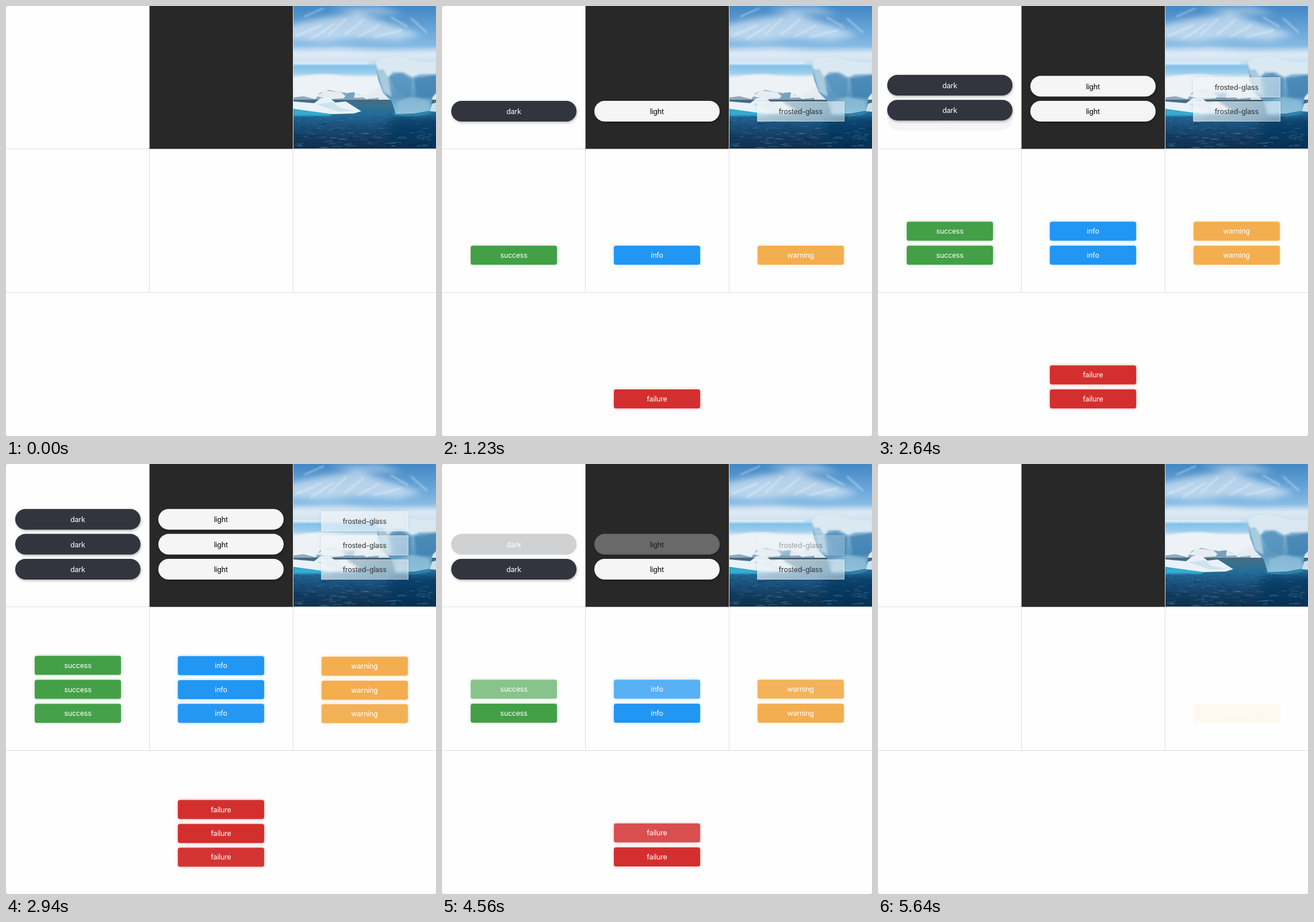
Write an HTML page that moves like this. It is 748 px wide and 748 px high and loops after 6060 ms.

```html
<!DOCTYPE html>
<html lang="en">
<head>
<meta charset="utf-8">
<title>Toast themes</title>
<style>
  html, body { margin: 0; width: 100%; height: 100%; overflow: hidden; background: #777; }
  #stage { position: relative; width: 748px; height: 748px; overflow: hidden; background: #fefefe; border-radius: 2px; }
  .line { position: absolute; background: #ddd; }
  .night {
    position: absolute; left: 249px; top: 0; width: 249px; height: 248px; background: #282828;
    border-left: 1px solid #aaa; border-bottom: 1px solid #808080;
  }
  #photo { position: absolute; left: 500px; top: 0; width: 248px; height: 248px; }
  .toast {
    position: absolute; box-sizing: border-box; display: flex; align-items: center; justify-content: center;
    font: 400 12.5px Inter, sans-serif; letter-spacing: -.2px; color: #fff; opacity: 0;
  }
  .pill { height: 36px; border-radius: 18px; }
  .dark { background: #32353d; box-shadow: 1px 2px 4px rgba(0, 0, 0, .28); }
  .light { background: #f5f5f5; color: #000; box-shadow: 1px 2px 4px rgba(0, 0, 0, .28); }
  .frosted-glass {
    height: 35px; color: #333; border: 1px solid rgba(255, 255, 255, .35);
    background: linear-gradient(120deg, rgba(240, 245, 248, .7), rgba(232, 240, 244, .52));
    backdrop-filter: blur(2px); box-shadow: 0 0 5px rgba(0, 0, 0, .12);
  }
  .flat { height: 33.5px; border-radius: 3.5px; }
  .success { background: #43a047; box-shadow: 0 0 5px rgba(67, 160, 71, .45); }
  .info { background: #2196f3; box-shadow: 0 0 5px rgba(33, 150, 243, .45); }
  .warning { background: #f3ae50; box-shadow: 0 0 5px rgba(243, 174, 80, .45); }
  .failure { background: #d32f2f; box-shadow: 0 0 5px rgba(211, 47, 47, .45); }
</style>
</head>
<body>
<div id="stage">
  <svg id="photo" viewBox="0 0 248 248">
    <defs>
      <linearGradient id="sky" x2="0" y2="1">
        <stop offset="0" stop-color="#4387c4"/>
        <stop offset=".3" stop-color="#6fabdc"/>
        <stop offset=".42" stop-color="#86bbe4"/>
        <stop offset=".5" stop-color="#cfe2f0"/>
        <stop offset=".6" stop-color="#c4dff0"/>
        <stop offset=".63" stop-color="#83c1e9"/>
        <stop offset=".7" stop-color="#9ccdeb"/>
        <stop offset=".76" stop-color="#e8f0f5"/>
        <stop offset="1" stop-color="#dce8f0"/>
      </linearGradient>
      <linearGradient id="sea" x2="0" y2="1">
        <stop offset="0" stop-color="#48697f"/>
        <stop offset=".12" stop-color="#37718f"/>
        <stop offset=".3" stop-color="#246c99"/>
        <stop offset=".5" stop-color="#1b5480"/>
        <stop offset=".75" stop-color="#143f63"/>
        <stop offset="1" stop-color="#112f4c"/>
      </linearGradient>
      <linearGradient id="ice" x2="0" y2="1">
        <stop offset="0" stop-color="#cfe2ee"/>
        <stop offset=".35" stop-color="#7eafd0"/>
        <stop offset=".7" stop-color="#5a97c0"/>
        <stop offset="1" stop-color="#93c3dc"/>
      </linearGradient>
      <filter id="soft" x="-30%" y="-80%" width="160%" height="260%"><feGaussianBlur stdDeviation="6"/></filter>
      <filter id="haze" x="-20%" y="-20%" width="140%" height="140%"><feGaussianBlur stdDeviation="1.5"/></filter>
    </defs>
    <rect width="248" height="166" fill="url(#sky)"/>
    <g fill="#e9f1f8" filter="url(#soft)">
      <path d="M-10 34L45 22L110 12L165 30L225 50L180 60L110 56L50 62L-10 58Z" opacity=".62"/>
      <path d="M60 2L150 0L190 14L120 16Z" opacity=".45"/>
      <path d="M-10 76L80 72L150 82L258 78V92L-10 92Z" opacity=".6"/>
    </g>
    <g fill="none" stroke="#f3f8fb" stroke-linecap="round" filter="url(#haze)">
      <path d="M5 52L48 34M30 58L70 32M62 50L92 22M90 50L122 24M112 54L150 34M140 54L188 42M20 18L52 4M170 20L198 36M205 22L232 46" stroke-width="3" opacity=".4"/>
      <path d="M0 99H130" stroke-width="2.5" opacity=".8"/>
    </g>
    <path d="M0 125Q45 116 75 120T150 122V164H0Z" fill="#ecf2f6" filter="url(#haze)"/>
    <path d="M0 159L18 157L38 162L46 151L62 146L76 149L92 151L101 156L112 153L127 162L148 157V168H0Z" fill="#8fa9bc"/>
    <path d="M40 157L55 147L83 150L94 160L65 162ZM96 160L106 151L123 159ZM121 157L148 141L160 158L135 161Z" fill="#e5edf3"/>
    <path d="M87 161L95 151L107 150L105 162Z" fill="#74a2c0"/>
    <rect y="163" width="248" height="85" fill="url(#sea)"/>
    <path d="M0 179L70 184L63 191L0 191Z" fill="#35acd2" filter="url(#haze)"/>
    <path d="M0 166L36 169L48 160L62 159L73 168L91 166L118 183L105 187L67 188L0 179Z" fill="#e9f2f8"/>
    <path d="M40 171L68 167L80 177L106 182L78 184Z" fill="#bed9e9" opacity=".6"/>
    <path d="M168 194H260V260H160Z" fill="#06355c" opacity=".6" filter="url(#soft)"/>
    <path d="M174 187Q205 195 239 184" stroke="#2d8bb4" stroke-width="4" fill="none" filter="url(#haze)"/>
    <path d="M237 183L241 170L248 168V184Z" fill="#c9dfeb"/>
    <path d="M141 96L150 88L184 85L217 95L249 97V150L242 158L238 182L211 187L178 188L171 166L156 151L147 128Z" fill="url(#ice)"/>
    <g filter="url(#haze)">
      <path d="M146 112L163 114L171 158L156 150Z" fill="#a9cbde"/>
      <path d="M166 122L186 116L206 128L203 160L180 150Z" fill="#4f8fbc" opacity=".7"/>
      <path d="M210 126L249 120V150L240 160L214 158Z" fill="#3f80b1" opacity=".75"/>
      <path d="M180 166L205 158L236 165L236 181L209 185L182 186Z" fill="#8fc0da" opacity=".7"/>
      <path d="M142 96L151 88L184 86L216 95L249 97V118L219 119L207 124L191 115L173 115L165 124L157 111L147 111Z" fill="#d9e8f1"/>
    </g>
    <g id="waves" fill="none"></g>
  </svg>
  <div class="line" style="left:0;top:248px;width:748px;height:1px"></div>
  <div class="line" style="left:0;top:498px;width:748px;height:1px"></div>
  <div class="line" style="left:249px;top:0;width:1px;height:498px"></div>
  <div class="line" style="left:499px;top:0;width:1px;height:498px"></div>
  <div class="night"></div>
</div>
<script>
  const LOOP = 6060, STEP = 30, LAST_CHANGE = 5640, FADE = 300, RISE = 15;
  const ENTER = [850, 1740, 2640], LEAVE = [3540, 4440, 5340];
  const ENTER_STAGGER = .8;

  const themes = [
    { name: 'dark', shape: 'pill', x: 16, y: 165.3, width: 217.5, pitch: 43.4, delay: -22 },
    { name: 'light', shape: 'pill', x: 265, y: 165.3, width: 217.5, pitch: 43.4, delay: 0 },
    { name: 'frosted-glass', shape: '', x: 548, y: 166, width: 151.5, pitch: 42, delay: 22 },
    { name: 'success', shape: 'flat', x: 50, y: 416.5, width: 150, pitch: 41.8, delay: 49 },
    { name: 'info', shape: 'flat', x: 299, y: 416.5, width: 150, pitch: 41.8, delay: 66 },
    { name: 'warning', shape: 'flat', x: 548.7, y: 416.5, width: 150, pitch: 41.8, delay: 97 },
    { name: 'failure', shape: 'flat', x: 299, y: 666.5, width: 150, pitch: 41.8, delay: 80 }
  ];

  // Same curve as the CSS "ease" keyword.
  function ease(x) {
    if (x <= 0) return 0;
    if (x >= 1) return 1;
    const bezier = (u, a, b) => 3 * (1 - u) ** 2 * u * a + 3 * (1 - u) * u * u * b + u ** 3;
    let low = 0, high = 1;
    for (let i = 0; i < 20; i++) {
      const mid = (low + high) / 2;
      if (bezier(mid, .25, .25) < x) low = mid; else high = mid;
    }
    return bezier(low, .1, 1);
  }

  const stage = document.getElementById('stage');
  for (const theme of themes) {
    theme.toasts = ENTER.map((_, i) => {
      const toast = document.createElement('div');
      toast.className = `toast ${theme.shape} ${theme.name}`;
      toast.textContent = theme.name;
      Object.assign(toast.style, {
        left: theme.x + 'px', top: theme.y + 'px', width: theme.width + 'px', zIndex: 3 - i
      });
      stage.append(toast);
      return toast;
    });
  }

  function drawWaves() {
    let seed = 7;
    const random = () => (seed = seed * 16807 % 2147483647) / 2147483647;
    const waves = document.getElementById('waves');
    for (let i = 0; i < 240; i++) {
      const depth = random(), y = 191 + 56 * depth, x = 256 * random() - 8;
      const length = 4 + 10 * random() * (.5 + depth);
      const wave = document.createElementNS(waves.namespaceURI, 'path');
      wave.setAttribute('d', `M${x} ${y}q${length / 2} -1.5 ${length} 0`);
      wave.setAttribute('stroke', random() < .45 ? '#5688ad' : '#082744');
      wave.setAttribute('stroke-width', .7 + .7 * depth);
      wave.setAttribute('opacity', .4);
      waves.append(wave);
    }
  }

  function draw(time) {
    const t = Math.min(Math.floor(time % LOOP / STEP) * STEP, LAST_CHANGE);
    for (const { toasts, pitch, delay } of themes) {
      const entered = ENTER.map(start => ease((t - start - delay * ENTER_STAGGER) / FADE));
      toasts.forEach((toast, i) => {
        const left = ease((t - LEAVE[i] - delay) / FADE);
        const lift = entered.slice(i + 1).reduce((sum, p) => sum + p * pitch, 0);
        toast.style.opacity = left > .95 ? 0 : entered[i] * (1 - left);
        toast.style.transform = `translateY(${RISE * (1 - entered[i]) - lift}px)`;
      });
    }
  }

  drawWaves();
  const begin = performance.now();
  function tick() {
    draw(performance.now() - begin);
    requestAnimationFrame(tick);
  }
  tick();
</script>
</body>
</html>
```
